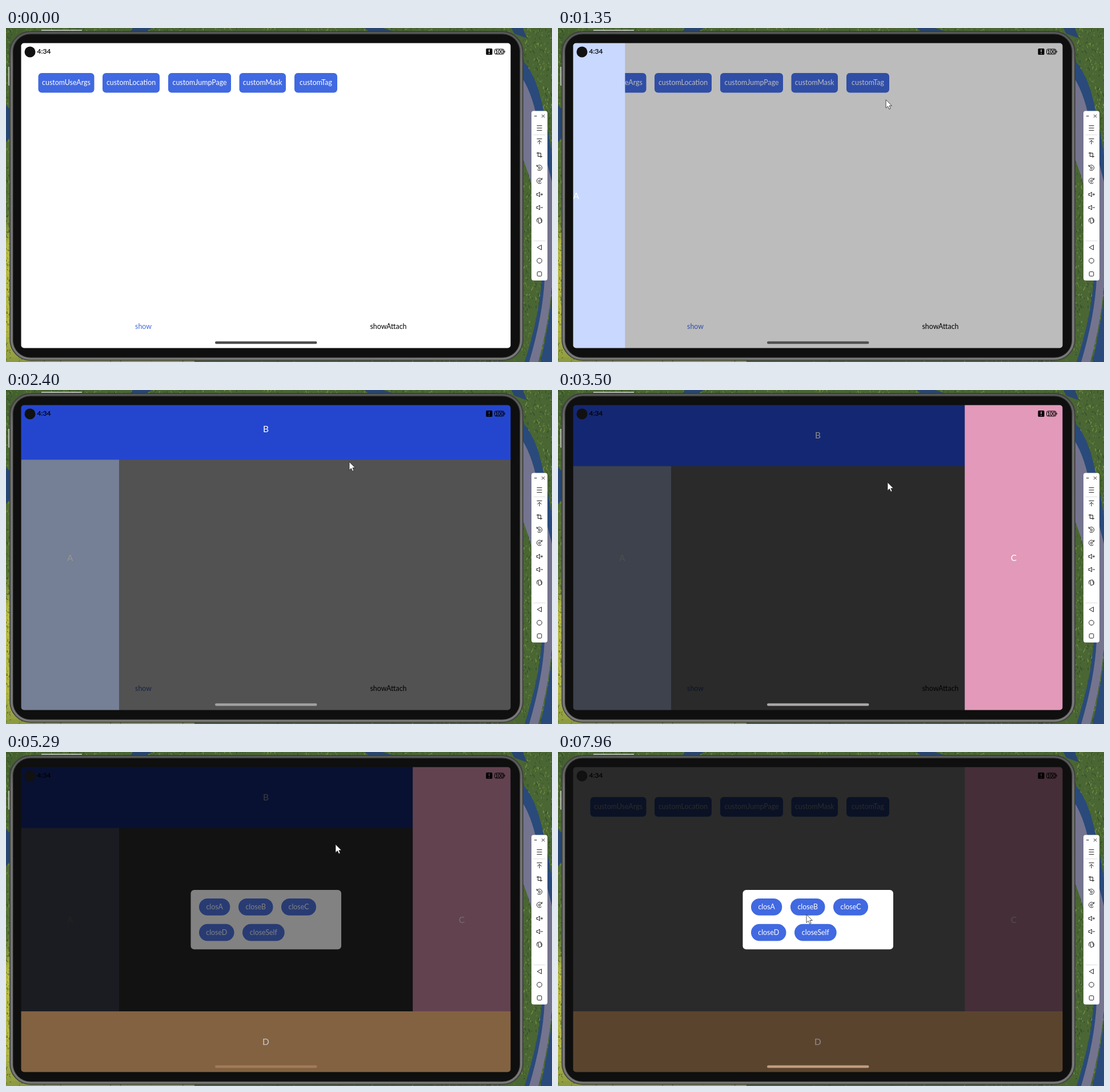
An HTML page that plays this animation: 956x586 px, repeating every 7.99 s.

```html
<!DOCTYPE html>
<html lang="en">
<head>
<meta charset="utf-8">
<title>Layered dialogs</title>
<style>
  html, body { margin: 0; width: 100%; height: 100%; overflow: hidden; background: #36522b; }
  svg { display: block; width: 956px; height: 586px; }
  text { font: 12.4px Lato, "Open Sans", sans-serif; text-anchor: middle; }
  .letter { font-size: 15.5px; fill: #fff; }
  .line { fill: none; stroke: #222; stroke-width: 1; }
</style>
</head>
<body>
<svg viewBox="0 0 956 586">
  <defs>
    <mask id="screen"><rect x="26.5" y="26.5" width="857" height="535" rx="5" fill="#fff"/></mask>
    <linearGradient id="meadow" x2="0" y2="1">
      <stop offset="0" stop-color="#44602f"/>
      <stop offset=".55" stop-color="#587238"/>
      <stop offset=".66" stop-color="#b9bb48"/>
      <stop offset=".9" stop-color="#b4b647"/>
      <stop offset="1" stop-color="#8d9a40"/>
    </linearGradient>
    <linearGradient id="rim" x2="0" y2="1">
      <stop offset="0" stop-color="#484a49"/>
      <stop offset=".1" stop-color="#686967"/>
      <stop offset="1" stop-color="#747573"/>
    </linearGradient>
  </defs>

  <!-- landscape -->
  <rect width="956" height="586" fill="#4a6633"/>
  <rect width="30" height="586" fill="url(#meadow)"/>
  <rect y="578" width="330" height="8" fill="#8d9a40"/>
  <g id="grass" fill="none" stroke-width="1.2"/>
  <path d="M0 135 9 145V190L0 200ZM222 0H255L240 10H215ZM628 0H660L690 10H640ZM885 0H905L912 18 890 10Z" fill="#28466f"/>
  <path d="M900 52Q925 75 938 130T956 225V345Q940 260 922 225T900 130Z" fill="#294a7b"/>
  <path d="M900 82Q920 110 930 160T956 270V450Q951 515 932 586H912Q936 500 938 440T918 265L900 215Z" fill="#74748f"/>
  <path d="M938 440Q934 505 908 586H916Q940 505 943 440ZM956 470Q949 530 936 586H956Z" fill="#294a7b"/>

  <!-- tablet -->
  <path d="M62 4H133M5 68V101" stroke="#d4d6d2" stroke-width="1.6"/>
  <rect x="7" y="6" width="898" height="577" rx="36" fill="url(#rim)" stroke="#3d3e3c" stroke-width="1.6"/>
  <rect x="9.500" y="8.500" width="893" height="572" rx="34" fill="none" stroke="#8b8c89" stroke-opacity=".45"/>
  <rect x="12.500" y="11" width="887" height="567" rx="30" fill="#0e0f0e" stroke="#252625"/>

  <g mask="url(#screen)">
    <rect x="26" y="26" width="858" height="536" fill="#fff"/>
    <g id="page">
      <text x="240.5" y="528" fill="#4169e1">show</text>
      <text x="669.5" y="528">showAttach</text>
    </g>
    <g id="layers"/>
    <circle cx="42" cy="42" r="9.5" fill="#111"/>
    <text x="66.5" y="45.3" font-weight="500" style="font-size:12px" stroke="#000" stroke-width=".25">4:34</text>
    <path fill-rule="evenodd" d="M842 36H850Q851.500 36 851.500 37.500V45.500Q851.500 47 850 47H842Q840.500 47 840.500 45.500V37.500Q840.500 36 842 36ZM845.200 37.500V42.600H846.800V37.500ZM845.200 44V45.600H846.800V44Z"/>
    <rect x="855.500" y="37" width="16.500" height="9" rx="2.500" fill="none" stroke="#000"/>
    <path d="M873.300 40V43" stroke="#000"/>
    <text x="863.800" y="44.700" style="font-size:8.500px;font-weight:700">100</text>
    <rect id="home" x="366" y="549.700" width="178.500" height="4.600" rx="2.300"/>
  </g>

  <!-- emulator toolbar -->
  <rect x="920" y="145.500" width="28" height="297.500" rx="4" fill="#fff"/>
  <path d="M924 187.500H944M924 373.500H944" stroke="#ddd"/>
  <g class="line">
    <path d="M925 154.500H929.500M938 152 943 157M943 152 938 157"/>
    <path d="M929.500 171.500H938.500M929.500 175.500H938.500M929.500 179.500H938.500"/>
    <path d="M929.500 194.500H938.500M934 204V197M930.500 200.500 934 197 937.500 200.500"/>
    <path d="M931.500 217.500V225.500H939M929 219.500H936.500V227.500"/>
    <path id="turn" d="M930 242.500A4.700 4.700 0 1 1 930.500 248.500M929.500 240V243H932.500"/>
    <circle cx="934" cy="245.500" r="1.700"/>
    <use href="#turn" transform="translate(1868 23) scale(-1 1)"/>
    <circle cx="934" cy="268.500" r="1.700"/>
    <path id="speaker" d="M929 290.500H931L934.500 288V296L931 293.500H929Z"/>
    <use href="#speaker" y="23"/>
    <path d="M936 292H940M938 290V294M936 315H940"/>
    <path d="M931.500 334 936 333 938 341 933 343ZM931 334Q928 336 930.500 341M937 334.500Q940 337 937.500 341"/>
    <path d="M937.500 380.800V389.200L930.200 385Z"/>
    <circle cx="934" cy="408.300" r="4.300"/>
    <rect x="930.200" y="427.700" width="7.600" height="7.600" rx="1.500"/>
  </g>

  <path id="cursor" d="M0 0V14.500L3.400 11.400 5.700 16.500 8.100 15.500 5.900 10.500H10.300Z" fill="#fff" stroke="#222" stroke-width=".8"/>
</svg>

<script>
const LOOP = 7990, FADE = 210, DIM = 0.45;
const SLIDE_LAG = 7; // panels trail their dimming slightly
const $ = id => document.getElementById(id);

function add(parent, tag, attrs, content = '') {
  const node = document.createElementNS('http://www.w3.org/2000/svg', tag);
  for (const key in attrs) node.setAttribute(key, attrs[key]);
  node.textContent = content;
  parent.append(node);
  return node;
}

function addButton(parent, label, x, y, width, height, rx) {
  add(parent, 'rect', { x, y, width, height, rx, fill: '#4169e1' });
  add(parent, 'text', { x: x + width / 2, y: y + height / 2 + 4.2, fill: '#fff' }, label);
}

// Blades of grass along the visible edges
let seed = 7;
const random = () => (seed = seed * 16807 % 2147483647) / 2147483647;
for (const shade of ['#24402a', '#6a8a3e', '#8fa552', '#36522d']) {
  let d = '';
  for (let i = 0; i < 420; i++) {
    const edge = random();
    const x = edge < 0.6 ? 903 + random() * 53 : edge < 0.75 ? random() * 9 : random() * 956;
    const y = edge < 0.75 ? random() * 586 : edge < 0.92 ? random() * 9 : 581 + random() * 5;
    d += `M${x.toFixed(1)} ${y.toFixed(1)}l${(random() * 5 - 2.5).toFixed(1)} ${(-1 - random() * 4).toFixed(1)}`;
  }
  add($('grass'), 'path', { d, stroke: shade, opacity: 0.7 });
}

[['customUseArgs', 56.5, 98], ['customLocation', 169, 100], ['customJumpPage', 284, 110],
 ['customMask', 408.5, 81.5], ['customTag', 505, 75]]
  .forEach(([label, x, width]) => addButton($('page'), label, x, 79, width, 34.5, 6));

// Each layer dims what lies below; dx, dy is the offset it slides in from
const layers = [
  { name: 'A', box: [26.5, 26, 171.5, 536], fill: '#c8d8ff', dx: -171.5, dy: 0, open: 1235, close: 6720 },
  { name: 'B', box: [26, 26, 858, 107.5], fill: '#2446cf', dx: 0, dy: -107, open: 2228, close: 7470 },
  { name: 'C', box: [712.2, 26, 171.5, 536], fill: '#e399b9', dx: 171.5, dy: 0, open: 3215 },
  { name: 'D', box: [26, 455, 858, 107], fill: '#a67c54', dx: 0, dy: 107, open: 4196 },
  { box: [323.5, 242, 263.5, 104.3], fill: '#fff', rx: 6, open: 5190 }
];
for (const layer of layers) {
  const [x, y, width, height] = layer.box;
  layer.mask = add($('layers'), 'rect', { x: 26, y: 26, width: 858, height: 536 });
  layer.panel = add($('layers'), 'g', {});
  add(layer.panel, 'rect', { x, y, width, height, rx: layer.rx || 0, fill: layer.fill });
  if (layer.name) {
    add(layer.panel, 'text', { class: 'letter', x: x + width / 2, y: y + height / 2 + 5.7 }, layer.name);
  } else {
    [['closA', 338, 257, 54.3], ['closeB', 407, 257, 60.5], ['closeC', 482, 257, 61],
     ['closeD', 338, 301.8, 61.5], ['closeSelf', 414, 301.8, 73.7]]
      .forEach(([label, bx, by, w]) => addButton(layer.panel, label, bx, by, w, 29.8, 14.9));
  }
}

// Keyframes: time followed by values
const cursorPath = [
  [60, 877, 555], [400, 500, 130], [510, 462, 76], [760, 540, 96], [1030, 540, 96],
  [1340, 572, 125], [1520, 607, 139], [2240, 607, 139], [2390, 601, 126], [2640, 601, 126],
  [3180, 577, 162], [5780, 577, 162], [6100, 536, 207], [6420, 355, 268], [6560, 365, 273],
  [6720, 365, 273], [7200, 436, 274], [7560, 436, 274], [7800, 435, 285]
];
const homeColors = [
  [1240, 76, 76, 76], [1440, 82, 85, 83], [2230, 82, 85, 83], [2390, 160, 160, 160],
  [3220, 160, 160, 160], [3430, 170, 166, 168], [4205, 170, 166, 168], [4340, 137, 96, 57],
  [5195, 137, 96, 57], [5405, 192, 155, 127]
];

const ease = p => (1 - Math.cos(Math.PI * Math.min(1, Math.max(0, p)))) / 2;

function sample(keys, t) {
  const next = keys.findIndex(key => key[0] > t);
  if (next < 0) return keys[keys.length - 1].slice(1);
  if (next === 0) return keys[0].slice(1);
  const from = keys[next - 1], to = keys[next];
  const p = (t - from[0]) / (to[0] - from[0]);
  return from.slice(1).map((value, i) => value + (to[i + 1] - value) * p);
}

function draw(t) {
  for (const { open, close = Infinity, name, dx, dy, mask, panel } of layers) {
    const progress = time => ease((time - open) / FADE) - ease((time - close) / FADE);
    const shown = progress(t), away = 1 - progress(t - SLIDE_LAG);
    mask.setAttribute('opacity', DIM * shown);
    panel.setAttribute('visibility', away < 1 ? 'visible' : 'hidden');
    if (name) panel.setAttribute('transform', `translate(${dx * away} ${dy * away})`);
    else panel.setAttribute('opacity', shown);
  }
  $('home').setAttribute('fill', `rgb(${sample(homeColors, t).map(Math.round)})`);
  $('cursor').setAttribute('visibility', t < 60 ? 'hidden' : 'visible');
  $('cursor').setAttribute('transform', `translate(${sample(cursorPath, t)})`);
}

const start = performance.now();
function tick() {
  draw((performance.now() - start) % LOOP);
  requestAnimationFrame(tick);
}
tick();
</script>
</body>
</html>
```
